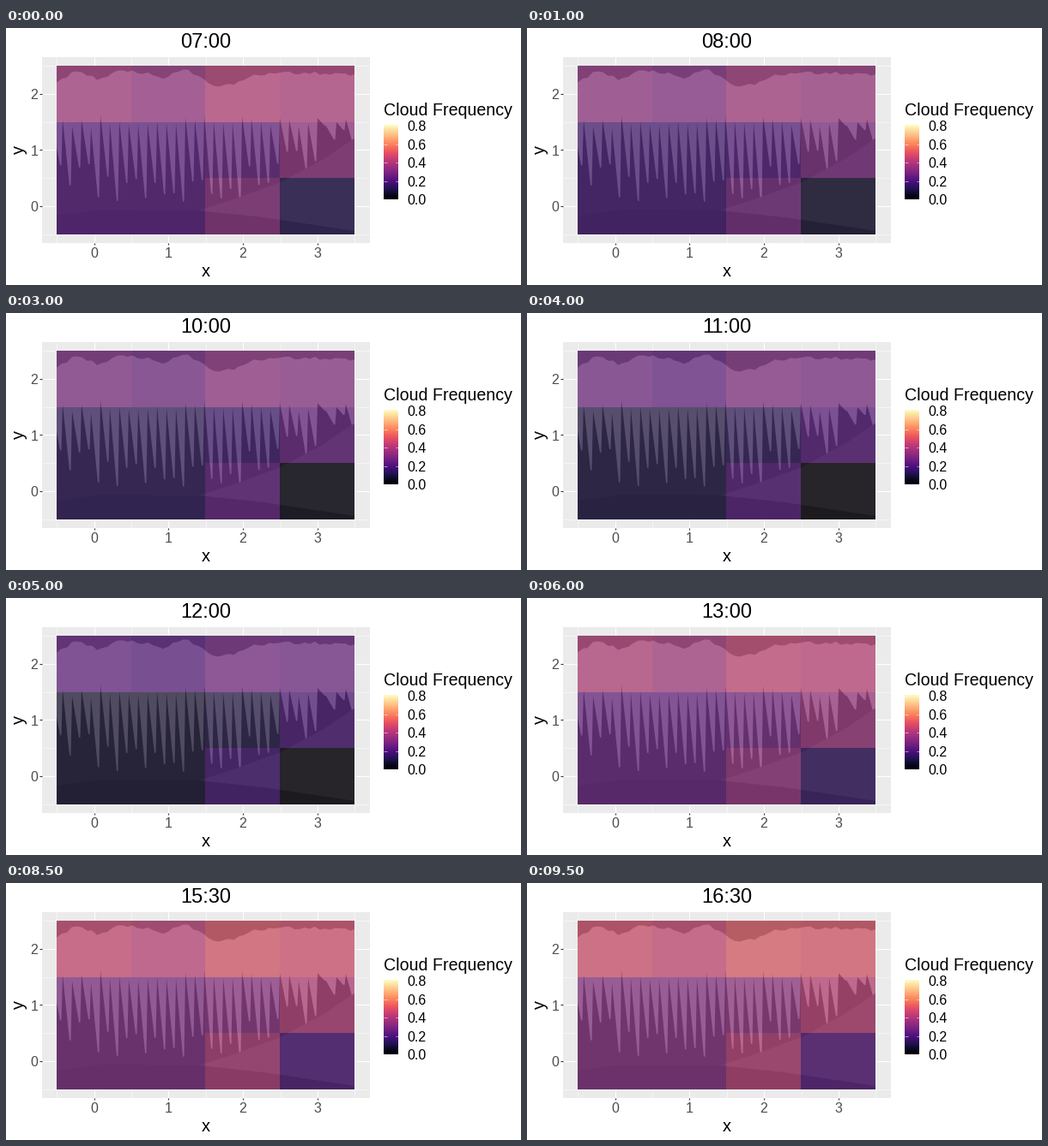
These frames come from a looping animation (600 px wide and 300 px high, 10 s). A matplotlib script:

```python
import numpy as np
import matplotlib.pyplot as plt
from matplotlib.animation import FuncAnimation
from matplotlib.patches import Polygon, Rectangle

plt.rcParams["font.family"] = "Liberation Sans"

STEPS, INTERVAL = 20, 500
LEFT, RIGHT, TOP, BOTTOM = 42, 423.6, 34.2, 250.6
X0, X1, Y0, Y1 = 59.4, 406.2, 44.0, 240.8
TILE_W, TILE_H = (X1 - X0) / 4, (Y1 - Y0) / 3

# Clouds thin out until noon, then close in; each tile keeps its own offset
HOURS = [7, 9, 10, 12, 13, 16.5]
MEAN_FREQUENCY = [0.29, 0.20, 0.20, 0.14, 0.32, 0.39]
TILE_OFFSET = np.array([
    [0.09, 0.06, 0.13, 0.11],
    [-0.08, -0.08, -0.05, 0.04],
    [-0.08, -0.08, 0.03, -0.18],
])

fig = plt.figure(figsize=(6, 3), dpi=100, facecolor="white")
ax = fig.add_axes([0, 0, 1, 1])


def label(x, y, text, size, color="black", **kwargs):
    kwargs.setdefault("va", "baseline")
    return ax.text(x, y, text, fontsize=size * 0.72, color=color, zorder=9, **kwargs)


def line(xs, ys, color, width):
    ax.plot(xs, ys, color=color, lw=width * 0.72, zorder=2, solid_capstyle="butt")


def shape(points, tone):
    patch = Polygon(points, fc=tone, ec="none", zorder=3)
    ax.add_patch(patch)
    patch.set_clip_path(photo_frame)


def draw_panel():
    ax.add_patch(Rectangle((LEFT, TOP), RIGHT - LEFT, BOTTOM - TOP, fc="#ebebeb", zorder=1))
    for x in np.linspace(X0, X1, 5):
        line([x, x], [TOP, BOTTOM], "white", 0.53)
    for y in np.linspace(Y0, Y1, 4):
        line([LEFT, RIGHT], [y, y], "white", 0.53)
    for k in range(4):
        x = X0 + (k + 0.5) * TILE_W
        line([x, x], [TOP, BOTTOM], "white", 1.07)
        line([x, x], [BOTTOM, BOTTOM + 2.75], "#333333", 1.07)
        label(x - 0.4, 267.8, str(k), 16, "#4d4d4d", ha="center")
    for k in range(3):
        y = Y1 - (k + 0.5) * TILE_H
        line([LEFT, RIGHT], [y, y], "white", 1.07)
        line([LEFT - 2.75, LEFT], [y, y], "#333333", 1.07)
        label(37.3, y + 6.2, str(k), 16, "#4d4d4d", ha="right")
    label(232.8, 290, "x", 20, ha="center")
    label(15, 142.4, "y", 20, ha="center", va="center", rotation=90)


def draw_mountains():
    rng = np.random.default_rng(4)
    sky, snow, rock = "#66646a", "#b4aeb4", "#4e4a50"
    shape([(X0, Y0), (X1, Y0), (X1, Y1), (X0, Y1)], sky)

    # Snow face under a jagged ridge
    peaks_x = [59, 83, 108, 134, 160, 185, 210, 240, 262, 290, 330, 407]
    peaks_y = [62, 50, 60, 48, 52, 58, 47, 67, 66, 55, 52, 54]
    ridge_x = np.linspace(59, 407, 60)
    ridge_y = np.interp(ridge_x, peaks_x, peaks_y) + rng.uniform(-2, 2, 60)
    shape([*zip(ridge_x, ridge_y), (407, 241), (59, 241)], snow)

    # Rock slope whose upper edge leaves tongues of snow running downhill
    edge = [(59, 241)]
    for x in np.arange(60, 410, 11):
        foot = 150 + 50 * np.sin(np.pi * (x - 40) / 300) + rng.uniform(-22, 22)
        edge += [(x - 5, rng.uniform(100, 118)), (x + 3, foot), (x + 4.5, foot)]
    shape(edge + [(407, 241)], rock)

    shape([(407, 128), (370, 153), (320, 180), (262, 201), (215, 216), (407, 241)], "#625d64")
    shape([(59, 219), (110, 212), (225, 213), (300, 221), (407, 237), (407, 241), (59, 241)],
          "#464249")


def draw_legend():
    x0, x1, y0, y1 = 440, 457, 114.1, 200.5
    label(439.7, 101.7, "Cloud Frequency", 19.6)
    ax.imshow(np.linspace(1, 0, 256)[:, None], cmap="magma", vmin=0, vmax=1,
              extent=(x0, x1, y1, y0), aspect="auto", zorder=1)
    for k, y in enumerate(np.linspace(y1, y0, 5)):
        for start in (x0, x1 - 3.5):
            line([start, start + 3.5], [y, y], "white", 0.53)
        label(467.2, y + 6, f"{k * 0.2:.1f}", 16)


photo_frame = Rectangle((X0, Y0), X1 - X0, Y1 - Y0, fc="none", ec="none")
ax.add_patch(photo_frame)
draw_panel()
draw_mountains()
draw_legend()
title = label(232.4, 23, "07:00", 23.6, ha="center")
tiles = ax.imshow(TILE_OFFSET, cmap="magma", vmin=0, vmax=0.8, alpha=0.6,
                  extent=(X0, X1, Y1, Y0), interpolation="nearest", aspect="auto", zorder=4)
ax.set_xlim(0, 600)
ax.set_ylim(300, 0)
ax.axis("off")


def update(step):
    hour = 7 + step / 2
    mean = np.interp(hour, HOURS, MEAN_FREQUENCY)
    tiles.set_data(np.clip(mean + TILE_OFFSET, 0, 0.8))
    title.set_text(f"{int(hour):02d}:{int(hour % 1 * 60):02d}")
    return tiles, title


animation = FuncAnimation(fig, update, frames=STEPS, interval=INTERVAL,
                          repeat=True, repeat_delay=0)
plt.show()
```
